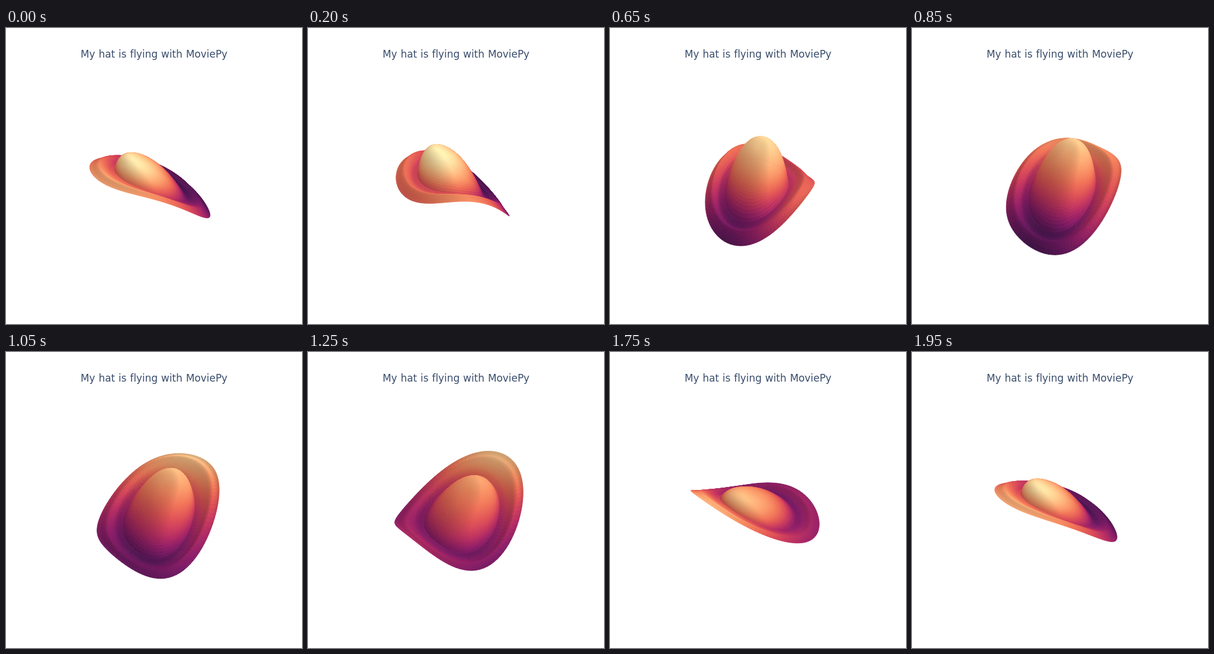
An HTML page with a canvas that plays this animation: 500x500 px, repeating every 2000 ms.

```html
<!DOCTYPE html>
<html lang="en">
<head>
<meta charset="utf-8">
<title>Flying hat</title>
<style>
  html, body { margin: 0; width: 100%; height: 100%; overflow: hidden; background: #fff; }
  canvas { position: absolute; left: 0; top: 0; width: 500px; height: 500px; }
  h1 {
    position: absolute; left: 0; top: 34px; width: 500px; margin: 0;
    font: 400 17px/20px Verdana, "DejaVu Sans", sans-serif;
    font-kerning: none; font-variant-ligatures: none;
    letter-spacing: -0.06px; word-spacing: 0.6px;
    text-align: center; white-space: nowrap; color: #3a4e6d;
  }
</style>
</head>
<body>
<canvas id="stage" width="500" height="500"></canvas>
<h1>My hat is flying with MoviePy</h1>
<script>
const LOOP = 2000, STEP = 50;
const RINGS = 60, SPOKES = 100, CROWN = 0.58;
const ctx = document.getElementById("stage").getContext("2d");
ctx.lineWidth = 0.8;
ctx.lineJoin = "round";

// dark to light
const SCALE = [
  [47, 15, 61], [76, 21, 80], [107, 24, 93], [138, 29, 99], [168, 40, 96], [195, 56, 90],
  [216, 80, 83], [231, 109, 84], [240, 142, 98], [246, 173, 119], [250, 205, 145], [253, 237, 176]
];

function colour(value, light) {
  const s = Math.min(0.999, Math.max(0, value)) * (SCALE.length - 1);
  const i = Math.floor(s), f = s - i;
  const rgb = SCALE[i].map((c, k) => Math.min(255, Math.round((c + (SCALE[i + 1][k] - c) * f) * light)));
  return `rgb(${rgb})`;
}

const bell = (x, mid, width) => Math.exp(-(((x - mid) / width) ** 2));

// How the hat is tilted, bent and placed at one phase of the loop
function poseAt(phase) {
  const wave = (mean, amp, lag = 0) => mean + amp * Math.cos(phase - lag * Math.PI / 180);
  const pitch = wave(60, -34, 4);
  const facing = Math.min(0.85, pitch / 110);
  return {
    cx: wave(250, -7), cy: wave(271, -4) + wave(0, 8, 90),
    width: wave(101, -10, 90), roll: wave(0, -44),
    pitch, lean: wave(0, 12), square: wave(-3, 3), skew: wave(0, 6),
    twist: wave(1, -25, 80), saddle: wave(0, -9.5, 30),
    lift: wave(2, 12, 60), shift: wave(0, -7, 90),
    crownX: wave(0, -14, 25) - wave(0, -7, 90), crownY: wave(46, 25, 110),
    facing, edge: Math.sqrt(1 - facing * facing),
    toneX: wave(0, -0.22), toneY: wave(0, -0.3),
    toneTwist: wave(0, -0.21, 78), toneTop: wave(0.38, 0.14, 60)
  };
}

function vertex(p, r, a) {
  const c = Math.cos(a), s = Math.sin(a), r2 = r * r;
  const dome = r < CROWN ? 1 - Math.pow(r / CROWN, 3) : 0;
  const ridge = bell(r, 0.85, 0.08), groove = bell(r, 0.62, 0.1);
  const core = 1 - r2 * r2;
  const depth = r * s * (1 + 0.25 * (1 - r2));
  const bend = r2 * (p.twist * Math.sin(2 * a) + p.saddle * Math.cos(2 * a));
  const up = p.roll * r * c + p.pitch * depth + p.square * r2 * r * Math.sin(3 * a)
    + p.skew * 2 * r2 * r * c * s * s + bend + p.lift * core
    + p.crownY * (dome + 0.13 * ridge);
  const pull = r * (1.5 - 0.5 * r);
  return {
    x: p.cx + p.width * r * c + p.lean * r * s + p.shift * core + p.crownX * dome,
    y: p.cy - up,
    z: -105 * depth * p.edge + p.facing * (85 * dome + 9 * ridge + bend / p.edge),
    tone: 0.45 + pull * (p.toneX * c + p.toneY * s) + r2 * p.toneTwist * Math.sin(2 * a)
      + p.toneTop * dome - 0.1 * groove + 0.03 * ridge
  };
}

// Surfaces turned to the left get less light
function lightOf(a, b, c, d) {
  const ux = c.x - a.x, uy = c.y - a.y, uz = c.z - a.z;
  const vx = d.x - b.x, vy = d.y - b.y, vz = d.z - b.z;
  const nx = uy * vz - uz * vy, ny = uz * vx - ux * vz, nz = ux * vy - uy * vx;
  const len = Math.hypot(nx, ny, nz) || 1;
  const left = (nz < 0 ? nx : -nx) / len;
  return 1.04 - 0.3 * Math.max(0, 0.35 * Math.abs(nz) / len + 0.75 * left);
}

function draw(ms) {
  const pose = poseAt(2 * Math.PI * ms / LOOP);
  const grid = [];
  for (let i = 0; i <= RINGS; i++) {
    const ring = [];
    for (let j = 0; j < SPOKES; j++) ring.push(vertex(pose, i / RINGS, 2 * Math.PI * j / SPOKES));
    grid.push(ring);
  }

  const tiles = [];
  for (let i = 0; i < RINGS; i++) {
    for (let j = 0; j < SPOKES; j++) {
      const k = (j + 1) % SPOKES;
      const pts = [grid[i][j], grid[i + 1][j], grid[i + 1][k], grid[i][k]];
      tiles.push({
        pts,
        z: pts.reduce((sum, v) => sum + v.z, 0),
        fill: colour(pts.reduce((sum, v) => sum + v.tone, 0) / 4, lightOf(...pts))
      });
    }
  }
  tiles.sort((a, b) => a.z - b.z);

  ctx.clearRect(0, 0, 500, 500);
  for (const { pts, fill } of tiles) {
    ctx.fillStyle = ctx.strokeStyle = fill;
    ctx.beginPath();
    pts.forEach(v => ctx.lineTo(v.x, v.y));
    ctx.closePath();
    ctx.fill();
    ctx.stroke();
  }
}

const start = performance.now();
let shown = -1;
function tick() {
  const ms = Math.floor((performance.now() - start) % LOOP / STEP) * STEP;
  if (ms !== shown) draw(shown = ms);
  requestAnimationFrame(tick);
}
tick();
</script>
</body>
</html>
```
